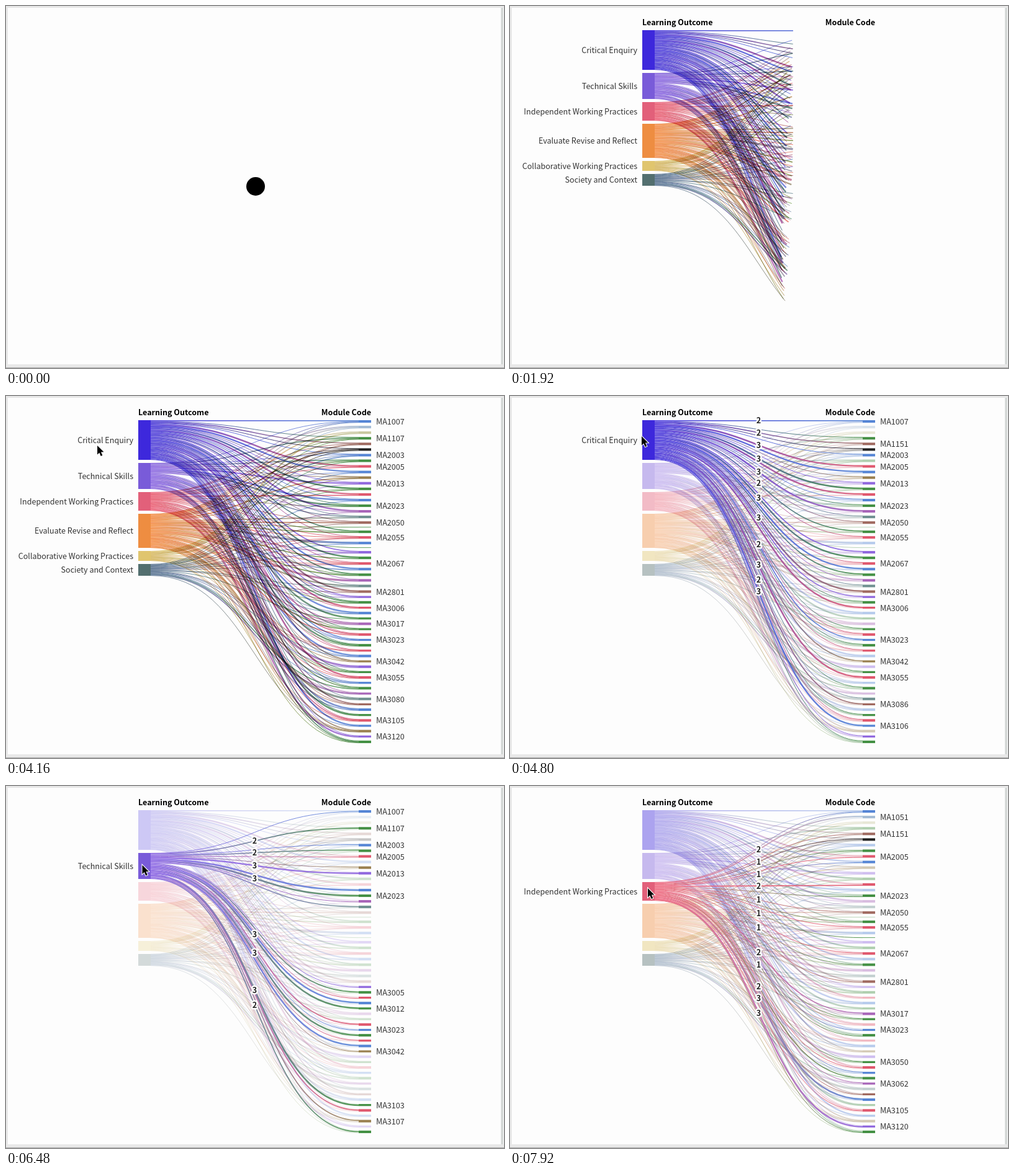
Animation of 802x584 px, one loop 8 s. Source, as an HTML page with a canvas:

```html
<!DOCTYPE html>
<html lang="en">
<head>
<meta charset="utf-8">
<title>Learning outcomes by module</title>
<style>
  html, body { margin: 0; width: 802px; height: 584px; overflow: hidden; }
  canvas { display: block; }
</style>
</head>
<body>
<canvas id="stage" width="802" height="584"></canvas>
<script>
const ctx = document.getElementById('stage').getContext('2d');
const LOOP = 8000, GAP = 5, TOP = 39, BOTTOM = 560;
const LEFT = 233, RIGHT = 568, NODE = 20, MID = (LEFT + RIGHT) / 2;
const FONT = '12.55px "Noto Sans CJK JP", "Noto Sans CJK SC", "Noto Sans", sans-serif';

const palette = {
  b: '#5585d5', g: '#449044', r: '#e0586e', p: '#a764b8', v: '#9068de', k: '#222222',
  m: '#a06a60', o: '#9a8050', s: '#6f9090', l: '#a5bcd5', t: '#c8c8a0'
};
const short = 'grbov', long = 'grbgpsm';
const colors = 'bltgmkb' + short + long + 'ggrbgv' + long + 'vgrbgpgrb' + short + long + 'b' + short + 'g';
const codes = `1007 1051 - 1107 1151 - 2003 - 2005 - - 2013 - - - 2023 - - 2050 - - 2055
  - - - - 2067 - - - - 2801 - 3005 3006 - 3012 3017 - - 3023 - - - 3042 - 3050 3055 - -
  3062 3080 3086 - 3103 3105 3106 3107 3120 -`.split(/\s+/);

// Links weigh 1, every n-th module 2, strong ones 3. Outcomes without links share the rest.
const outcomes = [
  { name: 'Critical Enquiry', color: '#3d28dc', link: '#4a38dc', height: 64, every: 4, offset: 0,
    skips: '1-2 7 19 22-23 35-37 43 45 48 50 53 57', strong: '8-9 12-13 16 25 27 31 34 47 56' },
  { name: 'Technical Skills', color: '#795bd9', link: '#8c66e4', height: 42, every: 2, offset: 1,
    links: '0 3 6-8 10-11 14-17 32-36 39-44 54-55 57 59', strong: '11 14-15 35-36 41 43 54' },
  { name: 'Independent Working Practices', color: '#e2607a', link: '#f0687e', height: 30, every: 12, offset: 1,
    links: '0-1 4-5 7-9 13 15 18 20-21 23 26 28 31 37-38 40-41 46-50 52-53 55 58-59', strong: '53 58' },
  { name: 'Evaluate Revise and Reflect', color: '#ee8d41', link: '#f79245', height: 55 },
  { name: 'Collaborative Working Practices', color: '#e0c56e', link: '#e0c56e', height: 16 },
  { name: 'Society and Context', color: '#536f6f', link: '#5f7d9c', height: 19 }
];
const [critical, technical, independent, evaluate, collaborate, society] = outcomes;

const within = (ranges, i) => ranges.split(' ').some(range => {
  const [from, to = from] = range.split('-');
  return i >= +from && i <= +to;
});

let seed = 7;
const random = () => (seed = seed * 16807 % 2147483647) / 2147483647;

function weight(o, i) {
  const linked = o.links ? within(o.links, i) : !within(o.skips, i);
  if (!linked) return 0;
  return within(o.strong, i) ? 3 : i % o.every === o.offset ? 2 : 1;
}

const modules = [...colors].map((letter, i) => {
  const units = new Map();
  const add = (o, n) => n && units.set(o, (units.get(o) || 0) + n);
  for (const o of [critical, technical, independent]) add(o, weight(o, i));
  let size = [...units.values()].reduce((a, b) => a + b, 0);
  const thin = i === 19 || i === 23;
  const full = thin ? 1 : i < 32 ? 5 : 4 + i % 2;
  for (; size < full; size++) {
    const pick = random();
    add(pick < .62 ? evaluate : pick < .8 ? collaborate : society, 1);
  }
  return { color: palette[letter], code: codes[i], units, size };
});

function stack(nodes) {
  let y = TOP;
  for (const node of nodes) {
    node.y = node.next = y;
    node.middle = y + node.height / 2;
    y += node.height + GAP;
  }
}
const total = modules.reduce((sum, m) => sum + m.size, 0);
const unit = (BOTTOM - TOP - GAP * (modules.length - 1)) / total;
for (const m of modules) m.height = m.size * unit;
stack(modules);
stack(outcomes);

function curveLength(dy) {
  let length = 0, px = 0, py = 0;
  for (let i = 1; i <= 24; i++) {
    const t = i / 24;
    const x = (1.5 * t * (1 - t) + t ** 3) * (RIGHT - LEFT), y = (3 - 2 * t) * t * t * dy;
    length += Math.hypot(x - px, y - py);
    px = x;
    py = y;
  }
  return length;
}

const links = [];
for (const outcome of outcomes) {
  const sum = modules.reduce((n, m) => n + (m.units.get(outcome) || 0), 0);
  for (const module of modules) {
    const units = module.units.get(outcome);
    if (!units) continue;
    const step = units / sum * outcome.height, width = units * unit;
    const y0 = outcome.next + step / 2, y1 = module.next + width / 2;
    outcome.next += step;
    module.next += width;
    const path = new Path2D();
    path.moveTo(LEFT, y0);
    path.bezierCurveTo(MID, y0, MID, y1, RIGHT, y1);
    const stroke = ctx.createLinearGradient(LEFT, 0, RIGHT, 0);
    stroke.addColorStop(0, outcome.link);
    stroke.addColorStop(1, module.color);
    links.push({ outcome, units, path, stroke, width: Math.max(1, width),
      length: curveLength(y1 - y0), middle: (y0 + y1) / 2 });
  }
}
links.reverse();

// Keeps the most important labels that do not collide.
function spread(items, rank) {
  const kept = [];
  for (const item of [...items].sort((a, b) => rank(b) - rank(a) || a.middle - b.middle)) {
    if (kept.every(other => Math.abs(other.middle - item.middle) > 17.5)) kept.push(item);
  }
  return kept;
}
const coded = modules.filter(m => m.code !== '-');
const allCodes = spread(coded, m => m.size);
for (const o of [critical, technical, independent]) {
  o.codes = spread(coded.filter(m => m.units.has(o)), m => m.units.get(o));
  o.counts = spread(links.filter(l => l.outcome === o), l => l.units);
}

const ramp = (t, from, to) => Math.min(1, Math.max(0, (t - from) / (to - from)));
const easeOut = (u, power) => 1 - (1 - u) ** power;

function track(t, keys) {
  let i = 1;
  while (i < keys.length - 1 && t > keys[i][0]) i++;
  const [from, ...a] = keys[i - 1], [to, ...b] = keys[i];
  const u = ramp(t, from, to);
  return a.map((value, j) => value + (b[j] - value) * u);
}
const fadeKeys = [[4320, 1], [4800, .42], [5120, .25], [5600, .25], [5960, 1], [6080, 1],
  [6480, .25], [7440, .25], [7660, .9], [7920, .42]];
const cursorKeys = [[3840, 16, 110], [4320, 212, 65], [5600, 212, 65], [6080, 219, 124],
  [6880, 220, 131], [7440, 220, 131], [7920, 222, 165]];

function focusAt(t) {
  return t < 4320 ? null : t < 6000 ? critical : t < 7660 ? technical : independent;
}
function hoverAt(t) {
  const leaving = (t >= 5640 && t < 6040) || (t >= 7500 && t < 7660);
  return leaving ? null : focusAt(t);
}

function text(string, x, y, align, color = '#333', bold = false) {
  ctx.font = (bold ? 'bold ' : '') + FONT;
  ctx.textAlign = align;
  ctx.fillStyle = color;
  ctx.fillText(string, x, y + 4.6);
}

function box(color, x, y, w, h) {
  ctx.fillStyle = color;
  ctx.fillRect(x, y, w, h);
}

function drawPage() {
  box('#fdfdfd', 0, 0, 802, 584);
  box('#e8e8e8', 0, 0, 802, 3);
  box('#e8e8e8', 0, 0, 3, 584);
  box('#d6d9d8', 797, 3, 4, 581);
  box('#e8e8e8', 0, 578, 802, 5);
  box('#a8a8a8', 0, 583, 802, 1);
}

function drawLinks(progress, focus, dim) {
  const drawGroup = (group, alpha, blend) => {
    ctx.globalAlpha = alpha;
    ctx.globalCompositeOperation = blend;
    for (const link of group) {
      ctx.setLineDash(progress < 1 ? [link.length * progress, link.length * 2] : []);
      ctx.strokeStyle = link.stroke;
      ctx.lineWidth = link.width;
      ctx.stroke(link.path);
    }
  };
  ctx.save();
  drawGroup(links.filter(l => l.outcome !== focus), .85 * dim, 'multiply');
  drawGroup(links.filter(l => l.outcome === focus), .9, 'source-over');
  ctx.restore();
}

function drawCounts(counts) {
  ctx.lineJoin = 'round';
  ctx.strokeStyle = '#fdfdfd';
  ctx.lineWidth = 5;
  ctx.font = 'bold ' + FONT;
  ctx.textAlign = 'center';
  for (const { units, middle } of counts) {
    ctx.strokeText(units, MID, middle + 4.6);
    text(units, MID, middle, 'center', '#222', true);
  }
}

function drawCursor(x, y) {
  ctx.save();
  ctx.translate(x, y);
  ctx.beginPath();
  [[0, 0], [0, 14.5], [3.3, 11.6], [5.7, 17], [8.3, 15.9], [5.9, 10.6], [10.4, 10.4]]
    .forEach(point => ctx.lineTo(...point));
  ctx.closePath();
  ctx.lineJoin = 'miter';
  ctx.lineWidth = 2;
  ctx.strokeStyle = '#fff';
  ctx.stroke();
  ctx.fillStyle = '#000';
  ctx.fill();
  ctx.restore();
}

function draw(t) {
  drawPage();
  if (t < 320) {
    ctx.fillStyle = '#000';
    ctx.beginPath();
    ctx.arc(402, 291, 15, 0, 7);
    ctx.fill();
    return;
  }
  const intro = easeOut(ramp(t, 280, 1120), 2);
  const focus = focusAt(t), hover = hoverAt(t);
  const [dim] = track(t, fadeKeys);

  if (t >= 1200) drawLinks(easeOut(ramp(t, 1200, 2590), 1.5), focus, dim);

  for (const o of outcomes) {
    ctx.globalAlpha = o === focus ? 1 : dim;
    box(o.color, LEFT - NODE, o.y, NODE * intro, o.height);
  }
  const grown = NODE * easeOut(ramp(t, 2400, 2880), 2);
  for (const m of modules) {
    ctx.globalAlpha = m.units.has(focus) ? 1 : dim;
    box(m.color, RIGHT, m.y, grown, m.height);
  }

  ctx.globalAlpha = intro;
  text('Learning Outcome', 213, 26.5, 'left', '#000', true);
  text('Module Code', 588, 26.5, 'right', '#000', true);
  for (const o of outcomes) {
    if (!hover || o === hover) text(o.name, 205, o.middle, 'right');
  }
  ctx.globalAlpha = ramp(t, 2900, 3040);
  for (const m of hover ? hover.codes : allCodes) text('MA' + m.code, 596, m.middle + .4, 'left');
  ctx.globalAlpha = 1;

  if (hover) drawCounts(hover.counts);
  if (t >= 3840) drawCursor(...track(t, cursorKeys));
}

function tick() {
  draw(performance.now() % LOOP);
  requestAnimationFrame(tick);
}
tick();
</script>
</body>
</html>
```
